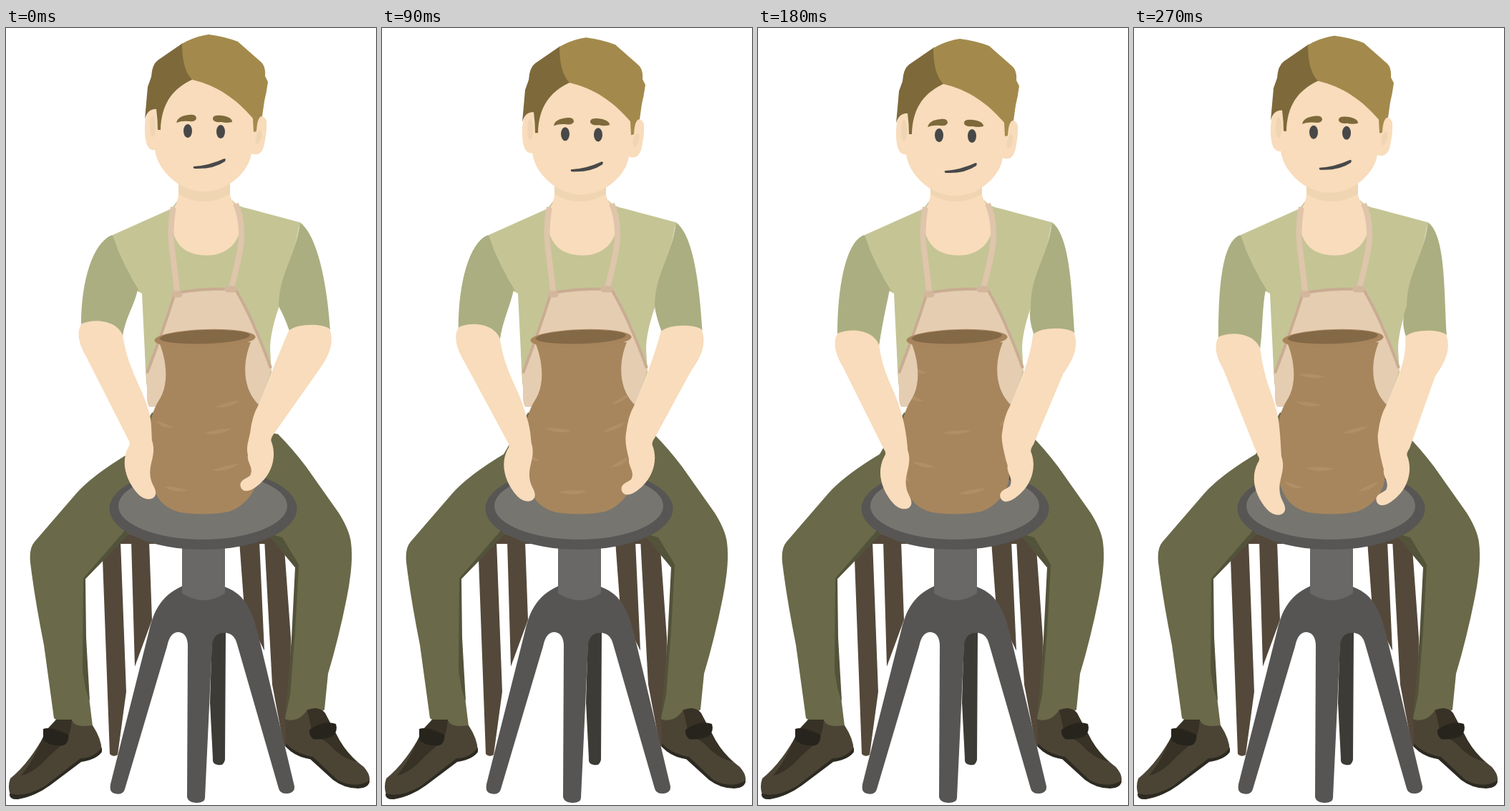
Recreate the animation shown at these times as an HTML page. Size 517x1083 px, loop 0.36 s.

```html
<!DOCTYPE html>
<html lang="en">
<head>
<meta charset="utf-8">
<title>Potter at the wheel</title>
<style>
  html, body { margin: 0; width: 100%; height: 100%; overflow: hidden; background: #fff; }
  svg { display: block; width: 100%; height: 100%; }
</style>
</head>
<body>
<svg viewBox="0 0 517 1083">
  <defs>
    <path id="potShape" d="M214 438C225 465 227 495 216 515Q203 535 201 555Q207 580 199 603C201 645 215 672 250 676Q282 680 312 674C335 666 350 645 351 625V570L353 525C332 505 329 470 342 438Z"/>
    <clipPath id="potClip"><use href="#potShape"/></clipPath>
  </defs>

  <!-- chair and back leg of the wheel -->
  <g fill="#54483a">
    <path d="M160 690H380V719H160Z"/>
    <path d="M135 740L160 715L168 925L156 1013Q150 1017 145 1012Z"/>
    <path d="M175 715H200L204 825L180 890Z"/>
    <path d="M326 715H354L361 868L333 810Z"/>
    <path d="M361 712H388L398 850L396 1005L388 1000L372 915Z"/>
  </g>
  <path d="M288 843H307L306 1020Q304 1029 296 1027Q288 1026 289 1018L285 940Z" fill="#3c3b36"/>

  <!-- trousers -->
  <path d="M204 536L170 594Q120 624 98 649L40 716Q32 725 34 745Q40 795 53 860L67 962Q90 980 121 973L112 900L108 768L165 706H375L407 749L400 860L390 963Q412 975 445 950L450 900Q465 850 476 795Q486 745 482 717Q480 700 465 676L419 611Q400 586 380 566L345 560Z" fill="#6a6949"/>
  <path d="M169 697L108 767L107 895Q111 925 117 938L112 850L111 768L172 705ZM364 704L386 710L409 748L404 840L397 930L390 962L399 850L404 752Z" fill="#53523a"/>

  <!-- shoes -->
  <path d="M54 985L70 964L92 965Q97 976 121 972Q133 990 134 1007Q120 1019 104 1021Q80 1040 54 1060Q25 1078 8 1073Q1 1060 6 1046Q32 1025 54 985Z" fill="#4b4435"/>
  <path d="M134 1003Q122 1018 104 1018L54 1057Q26 1073 5 1067Q4 1076 17 1075Q40 1071 61 1056L105 1023Q126 1020 134 1009Z" fill="#2c2a21"/>
  <path d="M55 980L70 964L92 964Q91 977 86 992L60 1015Q40 1038 21 1042Q40 1020 55 980Z" fill="#373126"/>
  <path d="M52 977Q62 973 87 985Q89 996 80 1000Q62 1002 52 992Z" fill="#27241d"/>
  <path d="M390 964Q410 968 421 950Q437 945 445 954L461 983Q474 1011 500 1030Q511 1042 507 1053Q490 1064 467 1053L428 1020Q407 1014 391 999Z" fill="#4b4435"/>
  <path d="M391 997Q405 1012 429 1016L463 1048Q487 1061 508 1049Q508 1059 492 1060Q473 1060 457 1048L425 1019Q404 1016 391 1002Z" fill="#2c2a21"/>
  <path d="M421 951Q437 944 446 955L460 982Q473 1008 491 1023Q468 1018 450 997L428 982Z" fill="#373126"/>
  <path d="M424 978Q445 964 461 970Q464 980 457 987Q440 993 429 991Q423 986 424 978Z" fill="#27241d"/>

  <!-- wheel -->
  <path d="M246 778C215 792 206 815 200 840L146 1054Q144 1066 152 1067Q163 1070 166 1061L225 862Q229 842 241 842Q253 843 254 860L253 1072Q255 1080 266 1080Q278 1080 278 1073L288 860Q290 843 305 843Q319 843 323 859L381 1060Q383 1068 394 1067Q404 1065 403 1057L354 852C345 815 336 790 306 779Z" fill="#565553"/>
  <path d="M246 715H306V788Q277 807 246 788Z" fill="#696867"/>
  <ellipse cx="275.5" cy="670" rx="131" ry="57" fill="#575654"/>
  <ellipse cx="275" cy="666" rx="118" ry="47" fill="#777570"/>

  <!-- torso and apron -->
  <path d="M148 289L195 268L231 252L240 240H316Q323 249 340 252L411 271L398 330Q382 360 381 390Q369 425 369 448L371 480L353 527H205L196 495L190 370L180 365Z" fill="#c5c495"/>
  <path d="M241 210H313V232Q314 240 322 249C338 285 318 317 280 317C242 317 226 290 234 252Q241 241 241 230Z" fill="#f8dcbb"/>
  <path d="M241 217V231Q276 253 313 231V217Z" fill="#efd5b2"/>
  <path d="M235 369L321 364Q332 385 350 418L371 475L354 528H203Q196 531 197 505L196 482Q213 435 235 369Z" fill="#e5cdb2"/>
  <g fill="none" stroke="#c9ac92" stroke-width="4">
    <path d="M197 481Q216 432 236 370Q278 361 321 365Q345 405 370 474"/>
    <path d="M234 250C225 290 236 325 239 368M321 245C338 285 324 325 315 362" stroke="#dfc5ab" stroke-width="8"/>
    <path d="M236 371H242M310 364H318" stroke="#d3b79d" stroke-width="9" stroke-linecap="round"/>
  </g>

  <!-- pot -->
  <use href="#potShape" fill="#a7865d"/>
  <path id="marks" clip-path="url(#potClip)" fill="#b18f66"/>
  <g transform="rotate(-2 278 433)">
    <ellipse cx="278" cy="433" rx="70.5" ry="13" fill="#a7845c"/>
    <ellipse cx="278" cy="430.5" rx="63" ry="9.5" fill="#846947"/>
  </g>

  <!-- arms: points marked e follow the elbow, points marked h the hand -->
  <g fill="#abae80">
    <path class="left" data-shape="M147,289C122,300 e105,350 e105,414L e163,430C e167,403 179,388 184,365L187,368Q163,330 149,289Z"/>
    <path class="right" data-shape="M411,271C436,290 e449,360 e453,420L e396,422Q e388,400 381,388C382,340 403,325 411,271Z"/>
  </g>
  <g fill="#f8dcbb">
    <path class="left" data-shape="M e163,428C e155,408 e125,404 e106,412C e98,422 e101,440 e112,458L h171,574Q h175,579 h171,584C h160,605 h167,630 h184,649C h192,658 h206,660 h209,650Q h210,645 h205,636C h194,612 h212,598 h204,575C h203,555 203,543 199,533C 190,500 e170,475 e163,428Z"/>
    <path class="right" data-shape="M e395,422C e405,412 e440,411 e452,419C e460,440 e450,459 e437,477L h374,566Q h369,573 h371,577C h378,595 h373,618 h357,633C h345,645 h332,650 h328,640C h325,631 h334,629 h341,624C h347,612 h336,606 h338,595C h335,585 339,575 341,565Q344,540 352,527L371,480Q381,455 e395,422Z"/>
  </g>

  <g id="head">
    <path d="M205 112Q193 116 194 145Q195 172 208 170Q212 197 240 217Q278 239 313 217Q339 199 343 175Q355 180 360 166Q365 145 364 130Q361 120 350 123L330 70L250 60Z" fill="#f8dcbb"/>
    <ellipse cx="205" cy="137" rx="4" ry="15" fill="#f0d5b4"/>
    <ellipse cx="353" cy="152" rx="4" ry="10" fill="#f0d5b4" transform="rotate(14 353 152)"/>
    <path d="M247 21L212 45Q204 51 203 68L198 82L194 127Q198 112 210 113Q212 128 212 142L216 142C217 105 233 84 262 71L257 40Z" fill="#7d693a"/>
    <path d="M246 22Q263 12 283 9Q306 12 324 19L357 48Q363 54 362 67L366 75Q364 90 361 102L358 123Q351 123 350 144L346 145L345 126C322 99 295 80 260 72Q246 58 246 22Z" fill="#a38a4c"/>
    <path d="M238 132Q239 124 252 121.500Q266 119 266 126Q265 131 256 130Q246 129 238 132ZM289 127Q288 121 301 122Q316 124 316 131Q308 133 301 131Q290 132 289 127Z" fill="#7d693a"/>
    <g fill="#484849">
      <ellipse cx="254" cy="143.5" rx="6" ry="9.5"/>
      <ellipse cx="300" cy="144.5" rx="6" ry="9.5"/>
      <path d="M262 193Q283 192 305 182Q308 182 306 186Q290 197 264 196Q261 196 262 193Z"/>
    </g>
  </g>
</svg>
<script>
  const STEP = 90, POSES = 4;
  const { sin, cos, PI } = Math;

  // Each joint travels by "reach" over the loop, bowing sideways halfway.
  const joints = {
    left: { e: { reach: [13, 18], bow: [-3, 0] }, h: { reach: [2, 22], bow: [4.5, -3] } },
    right: { e: { reach: [-16, 8], bow: [0, -1] }, h: { reach: [11, 20], bow: [4, 0] } }
  };

  // Scratches in the clay: height on the pot and starting angles.
  const scratches = { 488: [-1.77], 528: [0.45, -1.83], 564: [-0.9, 0.25], 616: [0.4, -1.6], 648: [-0.6, -2.23] };

  const marks = document.getElementById("marks");
  const head = document.getElementById("head");
  const limbs = document.querySelectorAll("[data-shape]");

  function bend(shape, arm, t) {
    const ease = t * t * (3 - 2 * t), swing = sin(PI * t);
    return shape.replace(/([eh])(\d+),(\d+)/g, (_, name, x, y) => {
      const { reach, bow } = arm[name];
      return `${+x + reach[0] * t + bow[0] * swing},${+y + reach[1] * ease + bow[1] * swing}`;
    });
  }

  // A lens-shaped scratch wrapped around the front of the pot.
  function scratch(y, angle) {
    if (cos(angle) < 0) return "";
    const at = (a, dy) => `${278 + 75 * sin(a)} ${+y + 28 * (cos(a) - 1) + dy}`;
    return `M${at(angle - 0.27, 1)}Q${at(angle, -5)} ${at(angle + 0.27, -2)}Q${at(angle, 6)} ${at(angle - 0.27, 1)}Z`;
  }

  function draw() {
    const pose = Math.floor(performance.now() / STEP) % POSES;
    const turn = pose * 2 * PI / POSES;
    const headX = 2.5 * sin(turn) - 0.5 * (1 - cos(turn));
    const headY = 3 - 3 * cos(turn) + 1.25 * sin(turn);

    head.setAttribute("transform", `translate(${headX} ${headY})`);
    marks.setAttribute("d", Object.entries(scratches)
      .flatMap(([y, angles]) => angles.map(a => scratch(y, a + 0.45 * pose))).join(""));
    for (const limb of limbs)
      limb.setAttribute("d", bend(limb.dataset.shape, joints[limb.getAttribute("class")], pose / (POSES - 1)));
    requestAnimationFrame(draw);
  }
  draw();
</script>
</body>
</html>
```
